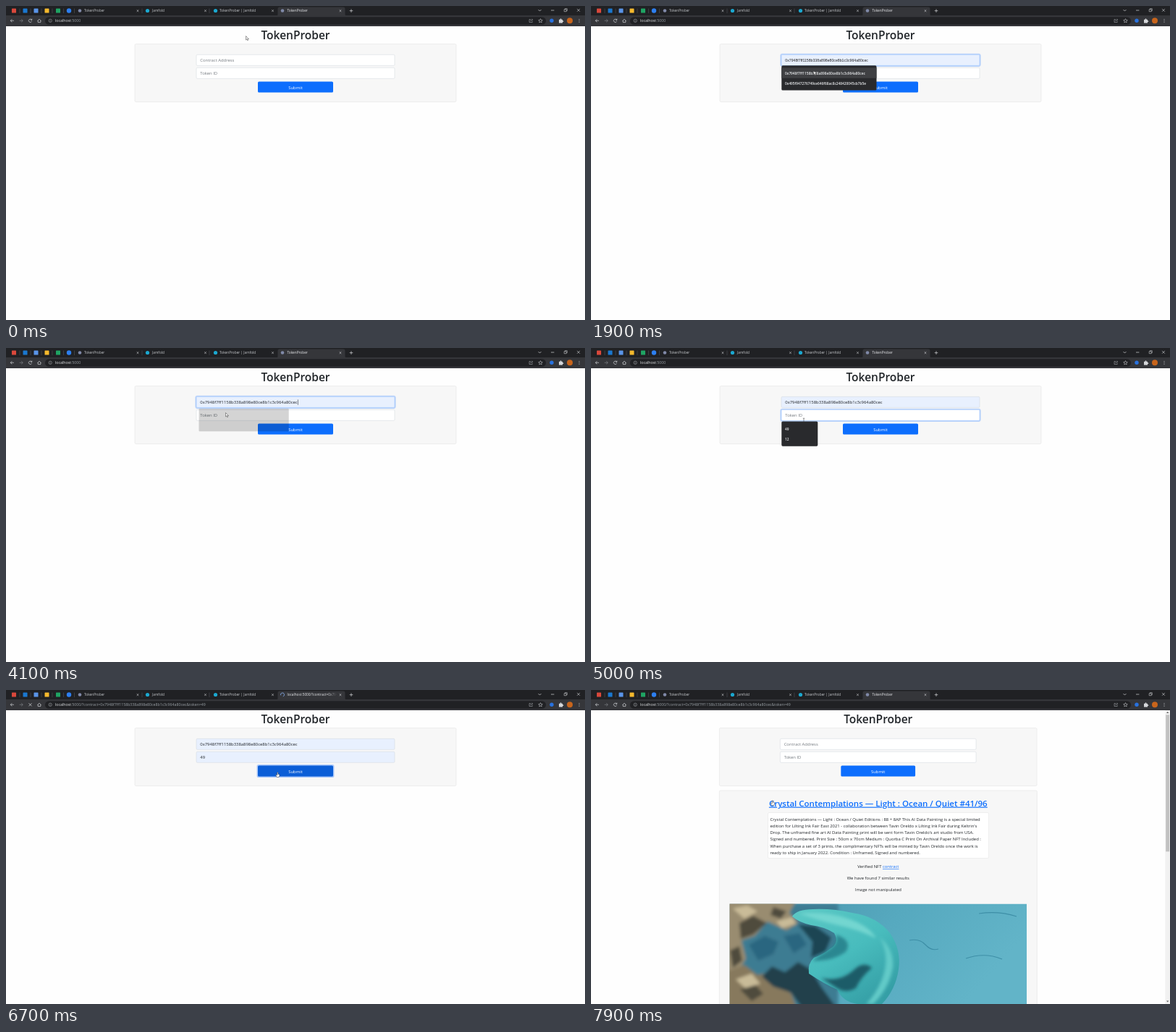
Write an HTML page that moves like this. It is 800x434 px and loops after 8000 ms.

```html
<!DOCTYPE html>
<html lang="en">
<head>
<meta charset="utf-8">
<title>TokenProber</title>
<style>
html, body { margin: 0; width: 100%; height: 100%; overflow: hidden; background: #fefefe; }
svg { display: block; width: 800px; height: 434px; font-family: "Open Sans", "Noto Sans", sans-serif; }
</style>
</head>
<body>
<svg id="stage" viewBox="0 0 800 434" xmlns="http://www.w3.org/2000/svg"></svg>
<script>
const LOOP = 8000, STEP = 100;
const SITE = 'TokenProber', HUB = 'Jamfold', ARTIST = 'Tavin Oreldo', WORK = 'Crystal Contemplations — Light : Ocean / Quiet';
const ADDRESSES = [
  '0x7948f7ff1158b338a898e80ce8b1c3c964a80cec',
  '0x495f947276749ce646f68ac8c248420045cb7b5e'
];
const QUERY = `/?contract=${ADDRESSES[0]}&amp;token=49`;
const DESCRIPTION = [
  `${WORK} Editions : 88 + 8AP This AI Data Painting is a special limited`,
  `edition for Lilting Ink Fair East 2021 - collaboration between ${ARTIST} x Lilting Ink Fair during Keltrin's`,
  `Drop. The unframed fine art AI Data Painting print will be sent form ${ARTIST}'s art studio from USA.`,
  'Signed and numbered. Print Size : 50cm x 70cm Medium : Quorba C Print On Archival Paper NFT Included :',
  `When purchase a set of 3 prints, the complimentary NFTs will be minted by ${ARTIST} once the work is`,
  'ready to ship in January 2022. Condition : Unframed, Signed and numbered.'
];
const BODY = 5.9, BLUE = '#0d6efd';

const rect = (x, y, w, h, fill, r = 0, extra = '') =>
  `<rect x="${x}" y="${y}" width="${w}" height="${h}" rx="${r}" fill="${fill}" ${extra}/>`;
const circle = (x, y, r, fill, extra = '') => `<circle cx="${x}" cy="${y}" r="${r}" fill="${fill}" ${extra}/>`;
const text = (x, y, size, fill, str, extra = '') =>
  `<text x="${x}" y="${y}" font-size="${size}" fill="${fill}" ${extra}>${str}</text>`;
const shape = (d, fill, extra = '') => `<path d="${d}" fill="${fill}" ${extra}/>`;
const line = (d, color = '#d5d7da', width = .7) => shape(d, 'none', `stroke="${color}" stroke-width="${width}"`);
const cross = (x, y, r, width) => line(`M${x - r} ${y - r}l${2 * r} ${2 * r}m0 ${-2 * r}l${-2 * r} ${2 * r}`, '#dfe1e4', width);
const MIDDLE = 'text-anchor="middle"';

const DEFS = `<defs>
  <linearGradient id="fade" gradientUnits="userSpaceOnUse" x1="445" x2="457" y1="0" y2="0">
    <stop stop-color="#e8eaed"/><stop offset="1" stop-color="#e8eaed" stop-opacity="0"/></linearGradient>
  <linearGradient id="sea" x2="1" y2=".3">
    <stop stop-color="#4790a8"/><stop offset=".55" stop-color="#56a9bf"/><stop offset="1" stop-color="#62b4c8"/></linearGradient>
  <linearGradient id="cloth" x2=".7" y2="1">
    <stop stop-color="#5cc9c5"/><stop offset=".55" stop-color="#48bcbd"/><stop offset="1" stop-color="#359fa6"/></linearGradient>
  <filter id="soft"><feGaussianBlur stdDeviation="2"/></filter>
  <clipPath id="photo"><rect x="191.5" y="295.5" width="410.5" height="139"/></clipPath>
</defs>`;

// Pointer moves: start, end, x, y, look on arrival
const MOVES = [
  [0, 0, 331.5, 41.5, 'arrow'],
  [600, 600, 310.5, 73, 'beam'],
  [1000, 1000, 307.5, 89.5, 'arrow'],
  [3000, 3000, 302.5, 100.5, 'arrow'],
  [3100, 3300, 359, 107, 'arrow'],
  [3400, 3700, 303.5, 89.5, 'arrow'],
  [4500, 4700, 298, 93, 'beam'],
  [4900, 5100, 290, 107, 'arrow'],
  [5200, 5500, 374, 115.5, 'hand'],
  [6400, 6800, 376, 117.5, 'hand'],
  [7200, 7400, 340, 128, 'arrow'],
  [7400, 7800, 251, 156, 'hand']
];

function pointerAt(t) {
  let x = 0, y = 0, look = 'arrow';
  for (const [start, end, toX, toY, kind] of MOVES) {
    if (t < start) break;
    const p = end > start ? Math.min(1, (t - start) / (end - start)) : 1;
    x += (toX - x) * p;
    y += (toY - y) * p;
    if (p === 1) look = kind;
  }
  return { x, y, look };
}

function pointer({ x, y, look }) {
  const outline = 'stroke="#222" stroke-width=".45"';
  const art = {
    arrow: shape('M0 0V5.4L1.3 4.2 2.2 6.2 3 5.9 2.2 4H3.9Z', '#fff', outline),
    beam: line('M-1.2-2.8H1.2M0-2.8V2.8M-1.2 2.8H1.2', '#333', .5),
    hand: shape('M-.8-3Q-.2-3.8.4-3V-.7L2.4-.2V1.8L1.6 3.4H-1.3L-2.7.7-2 .1-.8 1Z', '#fff', outline)
  };
  return `<g transform="translate(${x} ${y})">${art[look]}</g>`;
}

function tabs(t) {
  const waiting = t >= 5800 && t < 7300;
  const pinned = [[11, '#d9483b'], [26.5, '#1a78d0'], [41.5, '#5a95e8'], [56.5, '#f5b92d'], [72, '#1fa463']];
  const label = (x, str, fill = '#c4c7cb') => text(x, 8.2, 4.75, fill, str);
  let out = rect(0, 0, 800, 14, '#202124') + rect(0, 13, 800, 15, '#35363a') +
    shape('M373 14Q375.5 14 375.5 11V4Q375.5 1.5 378 1.5H466Q468.5 1.5 468.5 4V11Q468.5 14 471 14Z', '#35363a');
  for (const [x, color] of pinned) out += rect(x - 3, 3.5, 6, 6, color, .6);
  out += circle(87, 6.5, 3.2, '#2d7ff0');
  for (const x of [19, 34, 49, 64, 79.5, 94.5, 188, 281]) out += line(`M${x} 3.5V10`, '#5a5c60', .5);
  out += circle(102, 6.5, 2.3, '#8089a8') + label(108, SITE) +
    circle(195.5, 6.5, 2.6, '#1ba8d0') + label(202, HUB) +
    circle(289.5, 6.5, 2.6, '#1ba8d0') + label(295, `${SITE} | ${HUB}`);
  out += waiting
    ? `<g transform="rotate(${t * .36} 382 6.5)">${line('M382 4a2.5 2.5 0 1 1-2.5 2.5', t < 6400 ? '#9aa0a6' : '#8ab4f8')}</g>`
    : circle(382, 6.5, 2.3, '#8089a8');
  out += t >= 6400 && t < 7300
    ? label(388.5, 'localhost:5000/?contract=0x794', 'url(#fade)')
    : label(388.5, SITE, '#e8eaed');
  for (const x of [182, 275.5, 368.5, 462]) out += cross(x, 6.6, 1.3, .6);
  return out + line('M474.7 6.6h4.6m-2.3-2.3v4.6') + line('M735.5 5l2 2 2-2') + line('M753 6h4.4') +
    line('M771.2 4.7h3v3h-3zM772.3 4.7v-1h3v3h-1', '#d5d7da', .55) + cross(791, 5.8, 1.9, .6);
}

function toolbar(t) {
  const waiting = t >= 5800 && t < 7300;
  const arrow = (x, dir, color) => line(`M${x + 2.4 * dir} 20.3H${x - 2.2 * dir}m${2 * dir}-2.1l${-2.1 * dir} 2.1 ${2.1 * dir} 2.1`, color);
  let out = rect(54, 15.2, 692, 10.6, '#202124', 5.3);
  out += arrow(8.5, 1, '#d5d7da') + arrow(21, -1, '#7d8084');
  out += waiting ? cross(33.5, 20.3, 2, .7) : line('M35.5 19.2a2.2 2.2 0 1 0 .1 2M35.8 17.6v1.8h-1.8');
  out += line('M43.5 20.5l2.5-2.3 2.5 2.3M44.2 20v2.6h3.6V20') +
    circle(61.2, 20.3, 2.2, 'none', 'stroke="#b9bcc0" stroke-width=".5"') + line('M61.2 20v1.5m0-2.6v.6', '#b9bcc0', .5);
  out += text(68, 22.3, 5.23, '#e8eaed', `localhost<tspan fill="#9aa0a6">:5000${t >= 6400 ? QUERY : ''}</tspan>`);
  out += line('M725 18.5h-2v4h4.2V21M724.5 21q.2-2 3-2m-1-1.2l1.3 1.2-1.3 1.2', '#b9bcc0', .5) +
    line('M738.5 17.6l.8 1.8 2 .2-1.5 1.3.4 2-1.7-1-1.7 1 .4-2-1.5-1.3 2-.2z', '#d5d7da', .55);
  out += circle(754, 20.3, 2.7, '#2872df') +
    shape('M764 18.7h1.6q-.2-1.5.9-1.5t.9 1.5h1.6v1.5q1.4-.2 1.4.9t-1.4.9v1.4H764z', '#d5d7da') +
    circle(779, 20.3, 4, '#c8651c');
  for (const y of [18.4, 20.3, 22.2]) out += circle(792, y, .5, '#d5d7da');
  return out;
}

function field(cx, width, y, { hint, value = '', focus, preview, caret }) {
  const x = cx - width / 2;
  const ring = focus ? rect(x - .8, y - .8, width + 1.6, 16.6, 'none', 2, `stroke="${BLUE}" stroke-opacity=".25" stroke-width="1.6"`) : '';
  const box = rect(x, y, width, 15, value ? '#e8f0fe' : '#fff', 1.5, `stroke="${focus ? '#86b7fe' : '#ced4da'}" stroke-width=".5"`);
  const content = value && preview
    ? text(x + 5.3, y + 9.6, 5.2, '#222', value, 'font-family="Liberation Sans, Arial, sans-serif"')
    : text(x + 5.3, y + 9.6, BODY, value ? '#212529' : '#757b81', value || hint);
  return ring + box + content + (caret ? line(`M${x + 140.4} ${y + 4}v7.4`, '#111', .5) : '');
}

function form(cx, scale, first, second, hover, pressed) {
  const card = 444 * scale, width = 274 * scale, button = 104 * scale;
  return text(cx, 46.4, 15.5, '#212529', SITE, `${MIDDLE} font-weight="600"`) +
    rect(cx - card / 2, 52.5, card, 80, '#f7f7f7', 1.6, 'stroke="#dfdfdf" stroke-width=".5"') +
    field(cx, width, 67.3, { hint: 'Contract Address', ...first }) +
    field(cx, width, 85.3, { hint: 'Token ID', ...second }) +
    (pressed ? rect(cx - button / 2 - 1.5, 103, button + 3, 18, '#a9c8fb', 2.5) : '') +
    rect(cx - button / 2, 104.5, button, 15, hover ? '#0b5ed7' : BLUE, 1.6) +
    text(cx, 114.6, BODY, '#fff', 'Submit', MIDDLE);
}

function menu(y, width, items, active, opacity) {
  if (opacity < .3) return rect(266.5, y + 1.5, width - 7, 31.5, '#000', 1, `opacity="${opacity}"`);
  const rows = items.map((item, i) =>
    (i === active ? rect(263.3, y + 3.2 + i * 14.2, width, 14.2, '#3f4043') : '') +
    text(268, y + 12.3 + i * 14.2, 4.8, '#e8eaed', item, 'font-weight="600"')).join('');
  return `<g opacity="${opacity}">${rect(263.3, y, width, 34.2, '#292a2d', 1.6)}${rows}</g>`;
}

function photo() {
  const ground = rect(191.5, 295.5, 150, 145, '#3d7c92') +
    shape('M185 290H284L274 308 286 322 270 332 244 320 226 340 208 346 214 371 204 388 185 394Z', '#998c70') +
    shape('M185 390L212 380 230 394 248 390 259 408 277 420 284 440H185Z', '#87795d') +
    shape('M205 322L224 312 243 322 224 338 207 344ZM252 300L270 306 262 316 248 311ZM192 360L205 354 209 374 196 384ZM206 414L226 406 238 420 222 430Z', '#4f4b3e') +
    shape('M196 302L216 298 230 306 212 316ZM256 320L278 314 283 323 264 329ZM200 400L222 392 234 406 213 412Z', '#c9bb98') +
    shape('M218 352L240 340 259 348 252 365 231 374ZM266 340L288 336 298 352 280 364Z', '#2a6680') +
    shape('M236 396L250 382 268 390 286 376 304 386 318 410 340 440H292L276 418 252 410Z', '#23414b') +
    shape('M286 324L310 326 332 342 324 362 304 370 306 348Z', '#1f4552');
  return `<g clip-path="url(#photo)">` + rect(191.5, 295.5, 410.5, 139, 'url(#sea)') +
    `<g filter="url(#soft)">${ground}</g>` +
    shape('M278 313Q284 303 307 303Q335 302 361 308Q395 313 413 336Q429 359 425 386Q421 414 402 434H368Q348 431 340 414Q322 406 301 392Q299 378 308 370Q320 366 330 358Q344 350 336 336Q322 327 304 325Q287 321 278 313Z', 'url(#cloth)') +
    `<g filter="url(#soft)">` +
    shape('M338 338Q362 346 352 362Q332 376 306 374Q320 364 330 358Q343 349 338 338Z', '#2b8791') +
    shape('M318 398Q344 404 362 388Q376 374 388 384Q372 398 366 412Q352 420 340 412Z', '#1d5b67') +
    shape('M288 309Q323 305 355 316Q383 325 394 343Q369 331 341 325Q312 318 288 309Z', '#73d6d0') +
    shape('M399 342Q414 368 402 400Q394 420 380 434H390Q412 412 417 383Q419 358 399 342Z', '#62cac8') + '</g>' +
    line('M440 346Q454 343 462 352T480 358M536 309Q563 305 588 313M518 371Q544 362 568 372', '#3e8fa7', 1.2) + '</g>';
}

function results() {
  const cx = 396.8;
  const link = `fill="${BLUE}" text-decoration="underline"`;
  return rect(177.3, 139, 439, 300, '#f7f7f7', 1.6, 'stroke="#dfdfdf" stroke-width=".5"') +
    text(cx, 160.6, 11.5, BLUE, `${WORK} #41/96`, `${MIDDLE} font-weight="600" text-decoration="underline"`) +
    rect(244.5, 169.5, 305, 63, '#fff', 1.6, 'stroke="#e0e0e0" stroke-width=".5"') +
    DESCRIPTION.map((row, i) => text(247.5, 180.5 + i * 9.33, BODY, '#212529', row)).join('') +
    text(cx, 246.2, BODY, '#212529', `Verified NFT <tspan ${link}>contract</tspan>`, MIDDLE) +
    text(cx, 261.9, BODY, '#212529', 'We have found 7 similar results', MIDDLE) +
    text(cx, 277.6, BODY, '#212529', 'Image not manipulated', MIDDLE) + photo() +
    rect(793.4, 28, 6.6, 406, '#f1f1f1') + rect(794.2, 34.3, 5, 189, '#c1c1c1') +
    shape('M795 32l1.7-2 1.7 2zM795 429.5l1.7 2 1.7-2z', '#606060');
}

function formPage(t, hover) {
  const row = t >= 3000 && t < 3600 ? 1 : 0;
  const first = {
    value: t >= 1000 ? ADDRESSES[row] : '',
    preview: t < 3700,
    focus: t >= 1000 && t < 4900,
    caret: t >= 3700 && t < 4700
  };
  const second = { value: t >= 5100 ? '49' : '', preview: t < 5200, focus: t >= 4900 && t < 5800 };
  let out = form(400, 1, first, second, hover, t >= 5800);
  if (t >= 1000 && t < 4600) out += menu(82.3, 131.2, ADDRESSES, row, t < 3900 ? 1 : t < 4000 ? .8 : t < 4100 ? .5 : .17);
  if (t >= 4900 && t < 5400) out += menu(101.5, 50, ['49', '12'], t >= 5100 ? 0 : -1, t < 5300 ? 1 : .5);
  return out;
}

function scene(t) {
  const at = pointerAt(t);
  const hover = at.x > 346 && at.x < 452 && at.y > 104 && at.y < 120 && at.look === 'hand';
  const page = t < 6800 ? formPage(t, hover) : form(396.7, .988, {}, {}, hover) + results();
  return DEFS + rect(0, 0, 800, 434, '#fefefe') + page + tabs(t) + toolbar(t) + pointer(at);
}

const stage = document.getElementById('stage');
const began = performance.now();
let shown = -1;

function tick() {
  const t = Math.floor((performance.now() - began) % LOOP / STEP) * STEP;
  if (t !== shown) stage.innerHTML = scene(shown = t);
  requestAnimationFrame(tick);
}
tick();
</script>
</body>
</html>
```
